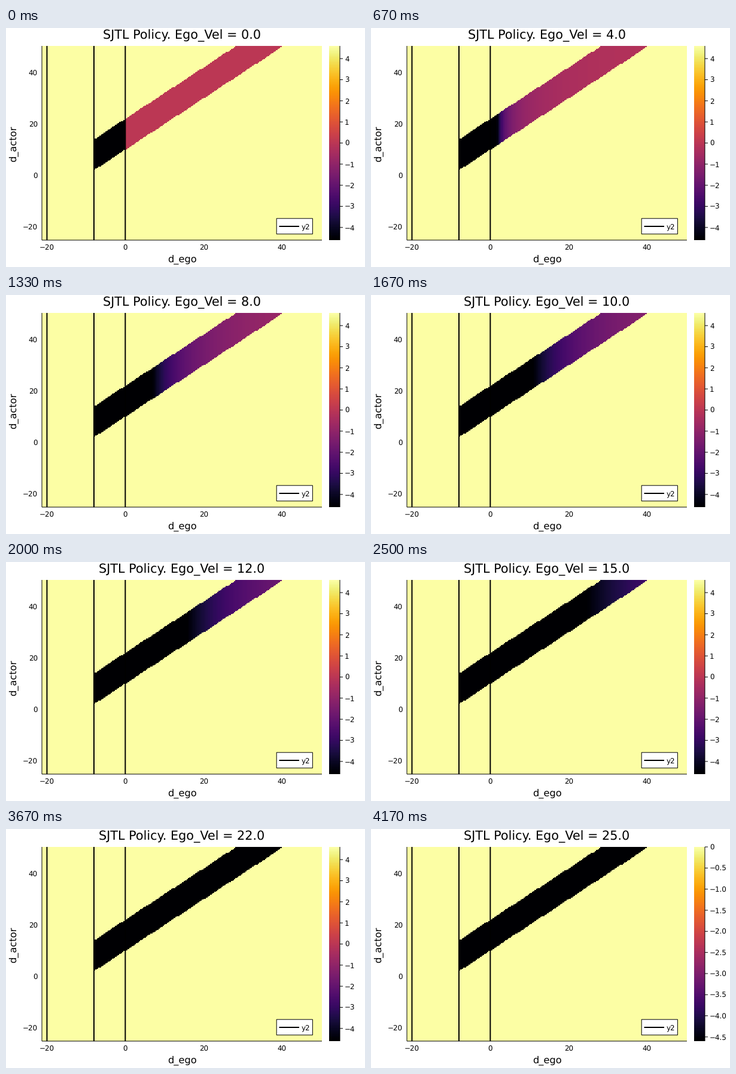
Recreate the animation shown at these times as a matplotlib script. Size 600 by 400 pixels, loop 4.34 s.

```python
import numpy as np
import matplotlib as mpl
import matplotlib.pyplot as plt
from matplotlib.animation import FuncAnimation

W, H, DPI = 600, 400, 100
PT = 72 / DPI                                # points per pixel
LEFT, RIGHT, TOP, BOTTOM = 60, 528, 30, 355  # plot area in pixels
A_MAX, V_MAX = 4.6, 25                       # acceleration and speed limits
SMALL, MEDIUM, LARGE = 11.85, 16.3, 20.74    # text sizes in pixels
TICKS, INTERVAL = 434, 10

mpl.rcParams["font.family"] = "DejaVu Sans"
mpl.rcParams["text.hinting"] = "none"
inferno = mpl.colormaps["inferno"]

fig = plt.figure(figsize=(W / DPI, H / DPI), dpi=DPI, facecolor="white")
ax = fig.add_axes([0, 0, 1, 1])
ax.axis("off")


def px(x):
    return 199.35 + 6.545 * x


def py(y):
    return 247 - 4.312 * y


def line(x0, y0, x1, y1, width=1):
    return ax.plot([x0, x1], [y0, y1], color="black", lw=width * PT,
                   solid_capstyle="butt", snap=False)[0]


def text(x, y, s, size=SMALL, ha="center", **kw):
    return ax.text(x, y, s, fontsize=size * PT, ha=ha, va="baseline", **kw)


def number(s):
    return s.replace("-", "\u2212")


# Policy on a 200 x 200 grid, looked up once per screen pixel
ego, actor = np.meshgrid(np.linspace(-21, 50, 200), np.linspace(-25, 50, 200))
eps = 1e-9
conflict = ((ego >= -8) & (actor >= ego + 10 - eps) & (actor <= ego + 22 + eps))
cols = np.arange(RIGHT - LEFT) * 200 // (RIGHT - LEFT)
rows = 199 - np.arange(BOTTOM - TOP) * 200 // (BOTTOM - TOP)


def policy_image(v):
    """Brake just hard enough to stop at zero, otherwise accelerate."""
    top = A_MAX if v < V_MAX else 0
    brake = np.where(ego > 0, -v * v / (2 * np.maximum(ego, eps)), -A_MAX)
    accel = np.where(conflict, np.maximum(brake, -A_MAX), top)
    rgba = inferno((accel + A_MAX) / (top + A_MAX), bytes=True)
    return rgba[np.ix_(rows, cols)]


images = [policy_image(v) for v in range(V_MAX + 1)]
heat = ax.imshow(images[0], extent=(LEFT, RIGHT, BOTTOM, TOP),
                 aspect="auto", interpolation="nearest")
ramp = inferno(np.linspace(1, 0, BOTTOM - TOP), bytes=True)[:, None]
ax.imshow(ramp, extent=(540, 558, BOTTOM, TOP), aspect="auto",
          interpolation="nearest")
ax.set(xlim=(0, W), ylim=(H, 0))

# Axes
line(LEFT, TOP, LEFT, BOTTOM)
line(LEFT, BOTTOM, RIGHT, BOTTOM)
for t in (-20, 0, 20, 40):
    text(px(t), 372, number(str(t)))
    text(53, py(t) + 5, number(str(t)), ha="right")
text(294, 391, "d_ego", MEDIUM)
text(16, 194, "d_actor", MEDIUM, rotation=90, rotation_mode="anchor")
title = text(294, 18, "", LARGE)

for x in (-20, -8, 0):
    line(px(x), TOP, px(x), BOTTOM, 2)

# Legend
ax.add_patch(plt.Rectangle((452.2, 318.8), 60.2, 26, fc="white", ec="black",
                           lw=PT, zorder=3, snap=False))
line(456.5, 332, 490, 332, 2).set_zorder(4)
text(494, 337, "y2", ha="left", zorder=4)

# Colour bar scales: the second one serves the top speed
line(558, TOP, 558, BOTTOM)


def scale(values, top, fmt):
    parts = []
    for v in values:
        y = TOP + (top - v) * (BOTTOM - TOP) / (top + A_MAX)
        parts.append(line(558, y, 563, y))
        label = number(format(v, fmt)) if v else "0"
        parts.append(text(566, y + 4.8, label, ha="left"))
    return parts


wide = scale(range(-4, 5), A_MAX, "d")
narrow = scale(np.arange(0, -5, -0.5), 0, ".1f")


def update(n):
    v = min(V_MAX, (3 * n + 1) // 50)        # six speeds per second
    heat.set_data(images[v])
    title.set_text(f"SJTL Policy. Ego_Vel = {v:.1f}")
    for part in wide:
        part.set_visible(v < V_MAX)
    for part in narrow:
        part.set_visible(v == V_MAX)
    return [heat, title, *wide, *narrow]


anim = FuncAnimation(fig, update, frames=TICKS, interval=INTERVAL,
                     init_func=lambda: update(0), repeat=True, repeat_delay=0)
plt.show()
```
